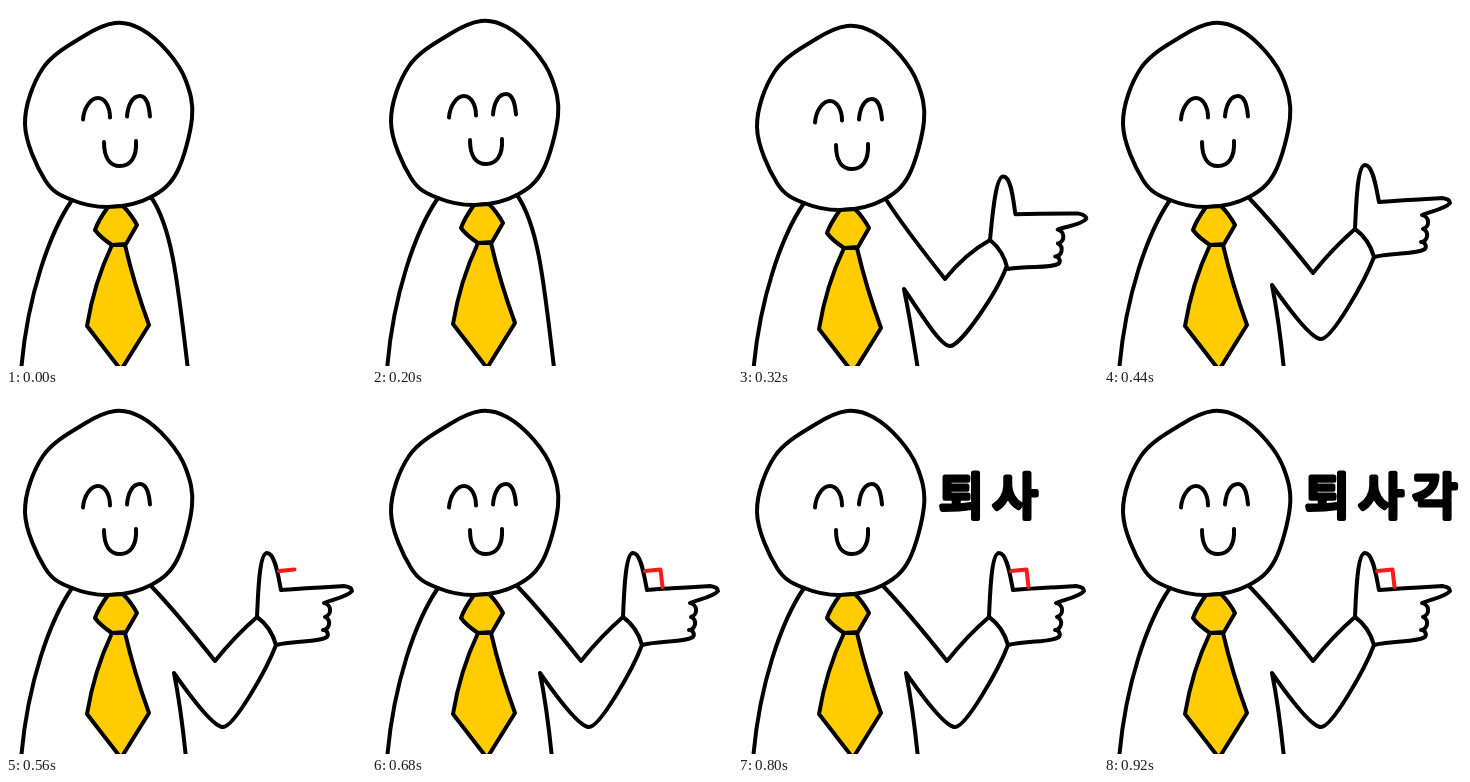
An HTML page for the animation above (2.16 s loop, 360 px wide and 360 px high).

```html
<!DOCTYPE html>
<html lang="ko">
<head>
<meta charset="utf-8">
<style>
  html, body { margin: 0; width: 100%; height: 100%; overflow: hidden; background: #fff; }
  svg { display: block; width: 100vw; height: 100vh; }
  .ink { fill: none; stroke: #000; stroke-width: 4; stroke-linecap: round; stroke-linejoin: round; }
  .tie { fill: #fc0; }
  .mark { stroke: #fb1a1a; }
  text {
    font: 500 49px "Noto Sans CJK KR", "Noto Sans CJK", sans-serif;
    letter-spacing: 8.5px;
    stroke: #000; stroke-width: 5; stroke-linejoin: round;
  }
</style>
</head>
<body>
<svg viewBox="0 0 360 360">
  <g id="body" class="ink">
    <path id="head"/>
    <path d="M77 113.500C78 101 85 92 92 92S104 101 104 111.500"/>
    <path d="M121 110.500C122 98 127 90 134 90S143 100 144 110.500"/>
    <path d="M98 136C98 152 104 160 114 160S131 152 130 135"/>
    <path d="M66 194C44 226 21 290 15 366"/>
    <path class="tie" d="M106 239H119Q128 278 143 319L115 364 81 320Q88 277 106 239Z"/>
    <path class="tie" d="M102 201L117 200Q125 208 131 219L120 238 106 239Q94 231 89 224Q92 215 102 201Z"/>
    <path id="side" d="M145 191C165 220 171 268 182 364"/>
  </g>
  <g id="arm" class="ink">
    <path id="sleeve"/>
    <g id="hand">
      <path d="M251 223C252 202 253 159 261 159S272 181 275 196C300 194 320 193 338 192Q346 193 346 197C341 203 328 205 318 209a7.200 7.200 0 0 1 1 14a6.800 6.800 0 0 1 -2 13a4.500 4.500 0 0 1 4 7C311 249 292 246 270 251"/>
      <path d="M251 223Q265 233 270 251"/>
    </g>
  </g>
  <path id="mark" class="ink mark"/>
  <text id="word" x="201" y="119.500"></text>
</svg>
<script>
const LOOP = 2160, STEP = 120, START = 200;
const WORD = "퇴사각";
const $ = id => document.getElementById(id);
const set = (id, name, value) => $(id).setAttribute(name, value);

// Smooth closed curve through a few points
function ring(pts) {
  const at = i => pts[(i + pts.length) % pts.length];
  const lean = (p, a, b) => p.map((v, k) => v + (b[k] - a[k]) / 6);
  return "M" + pts[0] + pts.map((p, i) => {
    const next = at(i + 1);
    return `C${lean(p, at(i - 1), next)} ${lean(next, at(i + 2), p)} ${next}`;
  }).join("") + "Z";
}

set("head", "d", ring([
  [109, 17], [135, 23], [162, 46], [180, 75], [186, 112], [171, 166], [145, 191],
  [105, 201], [66, 194], [39, 174], [19, 118], [37, 62], [78, 30]
]));

// The arm hangs lower as drop goes from 0 to 1
function poseArm(drop) {
  const joint = (x, y, dx, dy) => [x + dx * drop, y + dy * drop];
  const near = ([x, y], dx, dy) => [x + dx, y + dy];
  const shoulder = joint(146, 193, 3, 2);
  const bend = joint(209, 267, -2, 6);
  const wrist = joint(251, 223, 1, 11);
  const cuff = joint(270, 251, -2, 11);
  const elbow = joint(217, 333, -5, 7);
  const pit = joint(168, 279, -2, 4);
  set("sleeve", "d",
    `M${shoulder}Q${near(bend, -39, -49)} ${bend}Q${near(bend, 20, -25)} ${wrist}` +
    `M${cuff}C${near(cuff, -9, 24)} ${near(elbow, 11, 0)} ${elbow}` +
    `C${near(elbow, -10, 0)} ${near(pit, 14, 20)} ${pit}Q${near(pit, 7, 35)} 180 364`);
  set("hand", "transform", `translate(${drop} ${11 * drop}) rotate(${3 * drop} 251 223)`);
}

function render(t) {
  const step = Math.floor((t - START) / STEP) + 1;
  const bob = step === 1 ? -2 : step === 2 ? 3 : 0;
  const armOut = step >= 2;

  set("body", "transform", `translate(0 ${bob})`);
  $("side").style.display = armOut ? "none" : "";
  $("arm").style.display = armOut ? "" : "none";
  poseArm(step === 2 ? 1 : 0);

  const corner = ["M273 177L288.5 175.5", "L290.5 193"];
  set("mark", "d", corner.slice(0, Math.max(0, step - 3)).join(""));
  $("word").textContent = step < 6 ? "" : WORD.slice(0, step - 4);
}

const start = performance.now();
function tick() {
  render((performance.now() - start) % LOOP);
  requestAnimationFrame(tick);
}
render(0);
requestAnimationFrame(tick);
</script>
</body>
</html>
```
